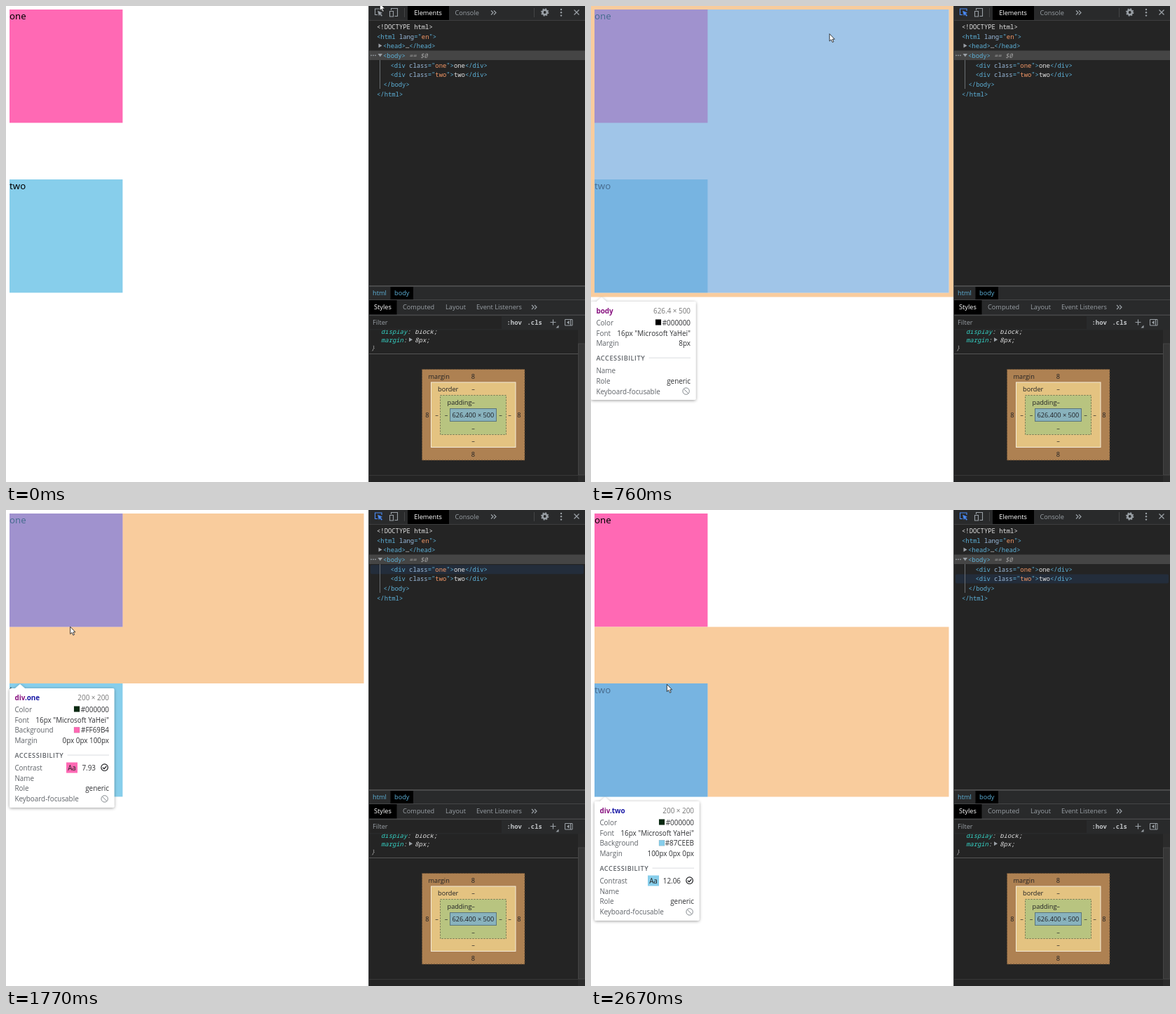
An HTML page for the animation above (2700 ms loop, 826 by 678 pixels).

```html
<!DOCTYPE html>
<html lang="en">
<head>
<meta charset="utf-8">
<title>Inspecting collapsed margins</title>
<style>
html, body { margin: 0; width: 100%; height: 100%; overflow: hidden; background: #fff; }
svg { display: block; width: 100%; height: 100%; }
text { font: 9.2px "Open Sans", sans-serif; white-space: pre; }
.page { font: 13.2px "Noto Sans", sans-serif; }
.mono { font: 8.87px "Noto Sans Mono", monospace; }
.tip { font-size: 9.9px; }
.bold { font-weight: 700; }
.it { font-style: italic; }
.caps { font-size: 9.2px; font-weight: 600; letter-spacing: .55px; }
</style>
</head>
<body>
<svg id="stage" viewBox="0 0 826 678">
  <defs>
    <filter id="shadow" x="-10%" y="-10%" width="120%" height="120%">
      <feDropShadow dx="0" dy="1" stdDeviation="2.2" flood-opacity=".4"/>
    </filter>
    <clipPath id="styles"><rect x="517" y="461.5" width="300" height="210"/></clipPath>
  </defs>
</svg>
<script>
const stage = document.getElementById('stage');
const rect = (x, y, w, h, fill, more = '') =>
  `<rect x="${x}" y="${y}" width="${w}" height="${h}" fill="${fill}" ${more}/>`;
const text = (x, y, s, fill, cls = '', anchor = 'start') =>
  `<text x="${x}" y="${y}" fill="${fill}" class="${cls}" text-anchor="${anchor}">${s}</text>`;
const span = (s, fill) => `<tspan fill="${fill}">${s}</tspan>`;
const line = (d, color, width = 1, more = '') =>
  `<path d="${d}" fill="none" stroke="${color}" stroke-width="${width}" ${more}/>`;
const shape = (d, fill, more = '') => `<path d="${d}" fill="${fill}" ${more}/>`;
const group = (id, body) => `<g id="${id}">${body}</g>`;
const box = (x, y, w, h) => `M${x} ${y}h${w}v${h}h${-w}z`;

// Page and highlight overlays
const PINK = '#ff69b4', SKY = '#87ceeb';
const CONTENT = 'rgba(111,168,220,.66)', MARGIN = 'rgba(246,178,107,.66)';

function page() {
  return rect(0, 0, 517, 678, '#fff')
    + rect(5, 5, 161.4, 161.4, PINK) + text(5, 19, 'one', '#000', 'page')
    + rect(5, 247, 161.4, 161.4, SKY) + text(5, 261, 'two', '#000', 'page');
}

function overlay(outer, inner) {
  return shape(box(...outer) + box(...inner), MARGIN, 'fill-rule="evenodd"')
    + shape(box(...inner), CONTENT);
}

// Inspector tooltip
const GREY = '#5f6368', INK = '#303134';

function noEntry(x, y) {
  return `<circle cx="${x}" cy="${y}" r="4.7" fill="none" stroke="#80868b"/>`
    + line(`M${x - 3.3} ${y - 3.3}l6.6 6.6`, '#80868b');
}

function check(x, y) {
  return `<circle cx="${x}" cy="${y}" r="4.8" fill="none" stroke="#202124" stroke-width="1.2"/>`
    + line(`M${x - 2.6} ${y}l2 2 3.3-3.8`, '#202124', 1.3);
}

function tooltip({ x, y, name, size, rows, contrast }) {
  const left = x + 7.4, right = x + 142;
  let mid = y + 30, out = '';
  const row = (label, value = '') => {
    out += text(left, mid + 3.6, label, GREY, 'tip')
      + text(right, mid + 3.6, value, INK, 'tip', 'end');
  };
  for (const [label, value, swatch] of rows) {
    row(label, value);
    if (swatch) out += rect(right - 50, mid - 4.5, 8, 8, swatch, 'stroke="#0003" stroke-width=".5"');
    mid += 14.9;
  }
  mid += 6;
  out += text(left, mid + 3.4, 'ACCESSIBILITY', GREY, 'caps')
    + line(`M${x + 82.5} ${mid - .5}H${right}`, '#dadce0');
  mid += 17.4;
  if (contrast) {
    const [ratio, color, sx] = contrast;
    row('Contrast');
    out += rect(x + sx, mid - 7.5, 16, 15, color)
      + text(x + sx + 8, mid + 4, 'Aa', '#222', 'tip', 'middle')
      + text(x + 123, mid + 3.6, ratio, INK, 'tip', 'end')
      + check(x + 135.6, mid - .3);
    mid += 14.9;
  }
  row('Name'); mid += 14.9;
  row('Role', 'generic'); mid += 14.9;
  row('Keyboard-focusable');
  out += noEntry(x + 135.6, mid - .3);
  const w = 149.5, h = mid + 12 - y;
  const frame = `M${x + 2} ${y}h6l7-6 7 6h${w - 24}q2 0 2 2v${h - 4}q0 2-2 2h${4 - w}q-2 0-2-2v${4 - h}q0-2 2-2z`;
  return shape(frame, '#fff', 'filter="url(#shadow)"')
    + text(left, y + 16.6, name, '#881280', 'tip bold')
    + text(right, y + 16.6, size, '#777', 'tip', 'end') + out;
}

const FONT = ['Font', '16px "Microsoft YaHei"'];
const divTip = (y, cls, color, hex, margin, contrast) => tooltip({
  x: 5, y, name: 'div' + span('.' + cls, '#1a1aa6'), size: '200 × 200', contrast,
  rows: [['Color', '#000000', '#0a2a12'], FONT, ['Background', hex, color], ['Margin', margin]]
});

const highlights = {
  body: overlay([0, 0, 517, 414.4], [5, 5, 505.5, 403.4]) + tooltip({
    x: 0, y: 421, name: 'body', size: '626.4 × 500',
    rows: [['Color', '#000000', '#000'], FONT, ['Margin', '8px']]
  }),
  one: overlay([5, 5, 505.5, 242], [5, 5, 161.4, 161.4])
    + divTip(254, 'one', PINK, '#FF69B4', '0px 0px 100px', ['7.93', PINK, 81]),
  two: overlay([5, 166.4, 505.5, 242], [5, 247, 161.4, 161.4])
    + divTip(415, 'two', SKY, '#87CEEB', '100px 0px 0px', ['12.06', SKY, 76])
};

// Developer tools panel
const DARK = '#242424', BAR = '#292a2b', EDGE = '#444546', LABEL = '#9aa0a6', TAG = '#5db0d7';
const chevrons = (x, y) => line(`M${x} ${y - 3}l3 3-3 3m4-6l3 3-3 3`, LABEL, 1.2);

function toolbar() {
  const dots = [5, 9.3, 13.6].map(y => `<circle cx="792" cy="${y}" r="1.2" fill="${LABEL}"/>`).join('');
  return rect(517, 0, 309, 20, BAR) + line('M517 20.5H826', EDGE)
    + `<g id="picker" stroke="${LABEL}" fill="${LABEL}">`
    + `<path d="M530 12.5h-3.5v-8.5h9.5v3" fill="none" stroke-width="1.1"/>`
    + `<path d="M530.5 7l6 2.8-2.3 1 2.5 2.8-1 .9-2.5-2.8-1.2 2z" stroke-width=".4"/></g>`
    + line('M549.5 6v-2.5h9v11h-4', LABEL, 1.1) + line('M547.5 7.5h5v7.5h-5z', LABEL, 1.1)
    + line('M568.5 3v13M753.5 3v13', EDGE)
    + rect(573, 0, 59, 20, '#000') + text(602, 12.8, 'Elements', '#fff', '', 'middle')
    + text(640.5, 12.8, 'Console', LABEL) + chevrons(692, 9.5)
    + `<g fill="none" stroke="${LABEL}"><circle cx="768.7" cy="9" r="3.2" stroke-width="2.6"/>`
    + `<circle cx="768.7" cy="9" r="4.9" stroke-width="1.6" stroke-dasharray="1.92 1.93"/></g>`
    + dots + line('M810.5 5.5l7 7m0-7l-7 7', LABEL, 1.3);
}

function tree() {
  const tag = s => span(`&lt;${s}&gt;`, TAG);
  const open = (name, attr, value) => span(`&lt;${name} `, TAG) + span(attr, '#9bbbdc')
    + span('="', TAG) + span(value, '#f29766') + span('"&gt;', TAG);
  const div = c => open('div', 'class', c) + c + tag('/div');
  const rows = [
    [529, '&lt;!DOCTYPE html&gt;'], [529, open('html', 'lang', 'en')],
    [538, tag('head') + '…' + tag('/head')], [538, tag('body')],
    [548.5, div('one')], [548.5, div('two')], [538.5, tag('/body')], [529, tag('/html')]
  ];
  return rect(517, 20.8, 309, 378, DARK) + rect(517, 63.5, 309, 13.5, '#454545')
    + rect(520, 78.3, 304, 13, '#232d3b', 'id="rowOne" rx="2"')
    + rect(520, 91.5, 304, 13, '#232d3b', 'id="rowTwo" rx="2"')
    + line('M533.5 77V118', '#6b6f73')
    + shape('M531.5 53.5l5 3-5 3z', LABEL) + shape('M530.5 68h6.5l-3.2 4.5z', LABEL)
    + [521, 524, 527].map(x => `<circle cx="${x}" cy="70.3" r=".9" fill="${LABEL}"/>`).join('')
    + rows.map(([x, s], i) => text(x, 33.1 + i * 13.65, s, '#e3e3e3', 'mono')).join('')
    + text(575, 74, '== $0', '#a0a0a0', 'mono it');
}

function stylesPane() {
  const rule = (y, name, value, x) => text(535, y, span(name, '#35d4c7') + ':', '#d0d0d0', 'mono it')
    + text(x, y, value, '#e3e3e3', 'mono it');
  const tabs = [[566, 'Computed'], [627, 'Layout'], [671, 'Event Listeners']];
  return rect(517, 399, 309, 19, BAR) + line('M517 399.5H826M517 418.5H826', EDGE)
    + rect(548.5, 400, 32.5, 18, '#000')
    + text(523, 412.2, 'html', TAG) + text(554, 412.2, 'body', TAG)
    + rect(517, 419, 309, 21, BAR) + rect(517, 419, 40.5, 21, '#000')
    + text(525, 432.3, 'Styles', '#fff')
    + tabs.map(([x, s]) => text(x, 432.3, s, LABEL)).join('') + chevrons(750, 429)
    + line('M517 440H826', EDGE)
    + rect(517, 440.5, 309, 237.5, DARK) + rect(517, 440.5, 309, 21, BAR)
    + rect(519, 442, 188, 18, DARK) + text(523, 454, 'Filter', LABEL)
    + text(714.5, 453.5, ':hov', '#c4c7ca', 'mono bold') + text(743.5, 453.5, '.cls', '#c4c7ca', 'mono bold')
    + line('M776.5 450.5h8m-4-4v8', LABEL, 1.2) + shape('M788.5 454.5v4h-4z', LABEL)
    + line('M797.5 446.5h10.5v8.5h-10.5zM805.5 446.5v8.5', LABEL) + shape('M803.5 448v5.5l-3.5-2.7z', LABEL)
    + `<g clip-path="url(#styles)">${rule(467, 'display', 'block;', 583.3)}${rule(478.5, 'margin', '8px;', 583.3)}`
    + shape('M575 472.3l5 3-5 3z', LABEL) + text(521, 490, '}', '#a0a0a0', 'mono it') + '</g>'
    + line('M517 495.5H816', '#555')
    + rect(816, 461, 10, 217, '#2b2b2b') + rect(816.5, 481, 9.5, 187, '#363636', 'stroke="#444"')
    + line('M517 668.5H826', '#383838');
}

function boxModel() {
  const edge = (x, y, w, h, fill, stroke, dash = '') =>
    rect(x, y, w, h, fill, `stroke="${stroke}" stroke-dasharray="${dash}"`);
  const label = (x, y, s, anchor) => text(x, y, s, '#202124', '', anchor);
  const mark = (x, y, s = '–') => label(x, y, s, 'middle');
  return edge(593.5, 517.5, 146.5, 129.5, '#ae8152', '#5c4630', '2 2')
    + edge(606.5, 536, 120.5, 92.5, '#e4c381', '#f3ead8')
    + edge(619.5, 554.5, 94, 56, '#b8c480', '#6d7350', '2 2')
    + edge(633.5, 573.5, 66, 18, '#88b2bd', '#5b757c')
    + label(602.5, 530.5, 'margin') + label(616, 549, 'border') + label(629.5, 567.8, 'padding')
    + mark(666.5, 586.3, '626.400 × 500')
    + mark(666.5, 530.5, '8') + mark(666.5, 641.7, '8') + mark(601, 586.3, '8') + mark(732, 586.3, '8')
    + [[666.5, 549], [666.5, 567.8], [666.5, 605], [666.5, 623.3],
       [614.5, 586.3], [628, 586.3], [705.5, 586.3], [718.5, 586.3]].map(p => mark(...p)).join('');
}

stage.insertAdjacentHTML('beforeend', page()
  + Object.entries(highlights).map(([id, body]) => group(id, body)).join('')
  + toolbar() + tree() + stylesPane() + boxModel() + line('M517.5 0V678', EDGE)
  + group('cursor', shape('M.3 .3v10.4l2.4-2.2 1.8 3.8 1.7-.8-1.7-3.6h3.1z', '#fff',
    'stroke="#111" stroke-width=".8" stroke-linejoin="round"')));

const LOOP = 2700;
const bursts = [[50, 530, 11], [590, 1090, 12], [1490, 1970, 11], [2020, 2230, 6], [2410, 2410, 1], [2620, 2670, 2]];
const path = [
  [2, 533, -4], [98, 532, 1], [242, 531, 7], [434, 530, 8], [530, 528, 9], [590, 521, 14],
  [635, 504, 22], [772, 258, 48], [908, 148, 65], [1000, 100, 74], [1090, 79, 77], [1490, 79, 77.5],
  [1634, 84, 118], [1778, 95, 190], [1922, 102, 249], [1970, 103.5, 257],
  [2230, 108, 291], [2410, 108, 290], [2620, 108, 272], [2670, 108, 248]
];

function snap(t) {
  let at = 0;
  for (const [from, to, steps] of bursts) {
    if (t < from) break;
    const gap = (to - from) / (steps - 1) || 1;
    at = from + gap * Math.min(steps - 1, Math.floor((t + 6 - from) / gap));
  }
  return at;
}

function pointer(t) {
  const i = path.findIndex(p => p[0] >= t);
  if (i === 0) return path[0].slice(1);
  if (i < 0) return path[path.length - 1].slice(1);
  const [t0, x0, y0] = path[i - 1], [t1, x1, y1] = path[i];
  const k = (t - t0) / (t1 - t0);
  return [x0 + (x1 - x0) * k, y0 + (y1 - y0) * k];
}

const el = id => document.getElementById(id);
const parts = Object.fromEntries(
  ['body', 'one', 'two', 'rowOne', 'rowTwo', 'cursor', 'picker'].map(id => [id, el(id)]));
const show = (id, on) => parts[id].setAttribute('visibility', on ? 'visible' : 'hidden');

function render(time) {
  const t = snap(time % LOOP);
  const [x, y] = pointer(t);
  const target = t < 700 ? '' : t < 860 ? 'body' : t < 1760 ? 'one' : t < 1960 ? 'body' : 'two';
  for (const id in highlights) show(id, id === target);
  show('rowOne', target === 'one' && t > 1080);
  show('rowTwo', t > 2140);
  const color = t < 290 ? LABEL : '#4a8af4';
  parts.picker.setAttribute('stroke', color);
  parts.picker.setAttribute('fill', color);
  parts.cursor.setAttribute('transform', `translate(${x} ${y})`);
}

const start = performance.now();
function tick() {
  render(performance.now() - start);
  requestAnimationFrame(tick);
}
tick();
</script>
</body>
</html>
```
